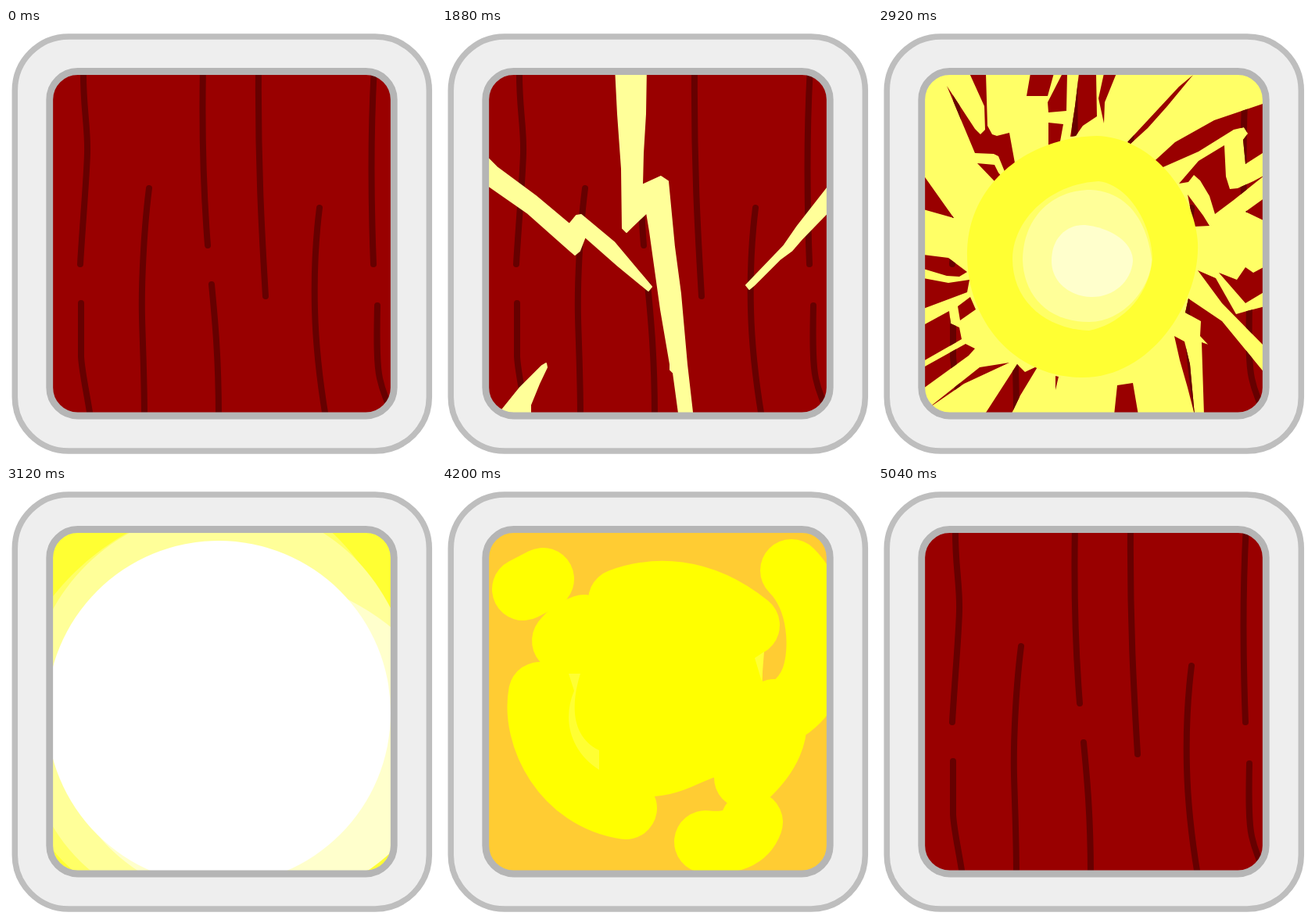
Animation, 550 px wide and 550 px high, one loop 5920 ms. Source, as an HTML page without scripts:

```html
<!DOCTYPE html>
<html lang="en">
<head>
<meta charset="utf-8">
<title>Lightning box</title>
<style>
/* One tick is 40 ms; everything is a function of --t. */
@property --t { syntax: "<integer>"; inherits: true; initial-value: 0; }
@keyframes tick { to { --t: 148; } }

html, body { margin: 0; width: 100%; height: 100%; overflow: hidden; background: #fff; }
svg { display: block; width: 100%; height: 100%; animation: tick 5.92s steps(148) -2ms infinite; }

/* visible from tick a up to tick b */
.on { opacity: clamp(0, min(var(--t) - var(--a) + 1, var(--b) - var(--t)), 1); }

/* a dash that runs along each spine, stopping at --end */
.sweep {
  fill: none; stroke: #fff; stroke-width: 78px; stroke-dasharray: 100px 300px;
  stroke-dashoffset: calc(1px * clamp(var(--end), 100 - (var(--t) - var(--s)) * var(--v), 100));
}
.bolt { fill: #ff9; stroke: #ff9; stroke-width: 2px; stroke-linejoin: round; }
.hole { r: calc(1px * max(0, (72 - var(--t)) * 55)); }
.flash { r: calc(1px * max(0, (var(--t) - 74) * 55)); }
.sun path {
  transform-origin: 262px 293px;
  transform: scale(max(0, 1 + (var(--t) - 73) * var(--k)));
}
.grain { fill: none; stroke: #600; stroke-width: 8px; stroke-linecap: round; }
.brush { fill: none; stroke: #ff0; stroke-width: 80px; stroke-linecap: round; }
</style>
</head>
<body>
<svg viewBox="0 0 550 550">
  <defs>
    <clipPath id="window"><rect x="56" y="56" width="440" height="440" rx="34"/></clipPath>

    <g id="wood">
      <rect x="50" y="50" width="452" height="452" fill="#900"/>
      <g class="grain">
        <path d="M99 50C98 100 105 125 104 160S98 250 95 302"/>
        <path d="M96 352V420C97 440 104 470 108 498"/>
        <path d="M183 205C176 260 173 330 174 370S177 450 177 498"/>
        <path d="M252 50C250 150 253 215 258 278"/>
        <path d="M263 328C267 370 272 420 272 498"/>
        <path d="M323 50C322 170 327 260 332 343"/>
        <path d="M401 230C396 270 394 320 395 360S401 450 409 498"/>
        <path d="M471 50C467 120 466 200 470 302"/>
        <path d="M475 355C474 400 474 430 478 448S485 470 489 482"/>
      </g>
    </g>

    <g id="spineA">
      <path pathLength="100" d="M510 210L450 268 410 305 320 428"/>
      <path pathLength="100" d="M40 440L88 394 140 354 262 240"/>
    </g>
    <g id="spineB">
      <path pathLength="100" d="M242 40L243 225 272 215 314 512"/>
      <path pathLength="100" d="M40 166L168 270 178 255 288 354"/>
      <path pathLength="100" d="M512 200L380 344"/>
      <path pathLength="100" d="M84 510L142 416"/>
    </g>
    <mask id="growA" maskUnits="userSpaceOnUse" x="0" y="0" width="550" height="550">
      <use href="#spineA" class="sweep" style="--s:27;--v:25;--end:-100"/>
      <use href="#spineA" class="sweep" style="--s:63;--v:20;--end:0"/>
    </mask>
    <mask id="growB" maskUnits="userSpaceOnUse" x="0" y="0" width="550" height="550">
      <use href="#spineB" class="sweep" style="--s:43;--v:25;--end:-100"/>
      <use href="#spineB" class="sweep" style="--s:64;--v:20;--end:0"/>
    </mask>

    <mask id="inward" maskUnits="userSpaceOnUse" x="0" y="0" width="550" height="550">
      <rect width="550" height="550" fill="#fff"/>
      <circle class="hole" cx="270" cy="285" fill="#000"/>
    </mask>

    <!-- gaps between the rays -->
    <clipPath id="gaps">
      <path d="M88 74L124 129 131 136 137 130 136 100 117 58H138L140 125 146 136 152 138 168 134 176 178 163 186 154 164 148 161 124 160ZM127 173L149 175 154 185 159 191 150 197ZM195 58H225L217 87H190ZM236 58H242L241 106 218 108 217 95ZM218 121L237 123 233 145 218 152Z"/>
      <path d="M257 58H279L280 113 262 125 253 138 246 139 252 100ZM289 58H305L290 95 289 122 282 90ZM403 60L385 75 319 146 323 148 345 128 370 100Z"/>
      <path d="M495 96L430 118 380 146 345 178 360 180 410 158 455 130 468 127 473 135 467 143 470 174 495 158ZM443 150L410 170 385 199 397 197 404 188 412 195 424 215 431 238 455 220 495 188 480 196 460 205 450 206 445 190ZM396 213L416 240 424 253 404 254ZM495 217L470 235 495 247Z"/>
      <path d="M436 313L459 322 470 306 480 313 495 305V337L470 352ZM409 310L432 320 458 366 472 362 495 356V408L440 352ZM397 346L440 375 495 442V478L480 495 455 492 427 410 412 394 413 375 393 364ZM414 402L426 406 456 495H417ZM379 394L392 401 399 430 405 495 396 460 386 425Z"/>
      <path d="M58 188L97 243 58 232ZM58 290L90 294 114 312 104 318 88 317 58 308ZM58 320L90 326 117 322 114 338 90 347 58 359ZM118 344L125 360 105 374 102 356ZM58 380L91 362 93 378 104 383 107 398 58 426ZM58 434L112 404 124 410 116 419 58 461Z"/>
      <path d="M62 488L130 434 168 428 110 455ZM178 430L188 440 205 432 182 470 170 495H136ZM227 445L231 446 227 463ZM306 457L326 454 333 495H302Z"/>
    </clipPath>

    <g id="melt">
      <rect x="50" y="50" width="452" height="452"/>
      <g fill="currentColor">
        <path d="M50 50H238C256 72 255 92 242 107C228 124 200 120 175 142C140 175 107 220 106 265C105 290 107 300 107 315C104 340 85 352 60 352H50Z"/>
        <path d="M502 282C475 290 464 305 463 325C464 365 455 375 438 405C425 430 420 445 400 448C375 449 355 465 354 502H502Z"/>
      </g>
    </g>
  </defs>

  <rect x="11.3" y="11" width="530" height="530" rx="69" fill="#eee" stroke="#bebebe" stroke-width="7.5"/>

  <g clip-path="url(#window)">
    <use href="#wood"/>

    <!-- lightning -->
    <g class="on" style="--a:28;--b:79">
      <path class="bolt" mask="url(#growA)" d="M498 212L474 234 446 265 402 300 418 306 372 352 384 356 318 420 326 424 402 362 388 356 436 312 424 305 454 270 475 256 498 235ZM56 420L82 392 130 356 122 346 190 300 184 290 250 246 256 250 196 308 206 312 140 352 148 362 90 400 56 434Z"/>
      <path class="bolt on" style="--a:28;--b:30" d="M498 212L474 234 447 265 447 270 453 270 475 256 498 233ZM56 420L66 406 79 392 84 391 91 395 85 403 76 411 56 435Z"/>
      <g mask="url(#growB)">
        <path class="bolt" d="M222 50L225 110 230 180 231 256 236 261 241 256 262 236 266 260 280 360 292 430 292 437 296 441 304 500H321L313 430 305 340 297 280 289 196 280 190 256 201 257 160 260 110 261 50Z"/>
        <path class="bolt" d="M50 158L70 178 120 215 163 251 172 240 178 239 220 274 268 331 264 336 225 304 183 267 176 285 170 290 163 284 110 237 50 195Z"/>
        <path class="bolt" d="M498 198L455 253 437 279 389 329 393 334 399 329 432 296 447 285 460 270 498 231Z"/>
        <path class="bolt" d="M66 502L100 460 128 432 133 429 134 434 124 455 113 482 113 502Z"/>
      </g>
    </g>

    <!-- rays and sun -->
    <g class="on" style="--a:67;--b:79">
      <g mask="url(#inward)">
        <rect x="50" y="50" width="452" height="452" fill="#ff6"/>
        <use href="#wood" clip-path="url(#gaps)"/>
      </g>
      <g class="sun">
        <path style="--k:.27" fill="#ff3" d="M114 285C116 200 190 140 280 138C350 140 405 210 409 275C412 350 350 447 262 447C175 447 112 375 114 285Z"/>
        <path style="--k:.38" fill="#ff6" d="M172 295C172 250 215 200 282 196C320 200 350 250 351 296C345 350 305 380 270 387C215 385 172 350 172 295Z"/>
        <path style="--k:.42" fill="#ff9" d="M185 296C186 240 225 207 272 207C325 210 345 255 350 296C350 330 315 376 270 376C215 376 186 340 185 296Z"/>
        <path style="--k:.75" fill="#ffc" d="M222 298C222 265 245 251 265 252C300 256 326 275 326 298C324 325 300 345 272 344C245 343 222 325 222 298Z"/>
      </g>
      <circle class="flash" cx="272" cy="290" fill="#fff"/>
    </g>
    <rect class="on" style="--a:79;--b:97" x="50" y="50" width="452" height="452" fill="#fff"/>

    <!-- cooling down -->
    <use href="#melt" class="on" style="--a:97;--b:99;fill:#fff;color:#ffc"/>
    <use href="#melt" class="on" style="--a:99;--b:101;fill:#ffc;color:#ff9"/>
    <use href="#melt" class="on" style="--a:101;--b:103;fill:#ff9;color:#ff6"/>
    <use href="#melt" class="on" style="--a:103;--b:105;fill:#ff3;color:#ff0"/>
    <g class="on" style="--a:105;--b:107">
      <rect x="50" y="50" width="452" height="452" fill="#fc3"/>
      <path fill="#ff0" d="M150 190L227 140 390 178 410 215V250L430 320 388 373H347C320 384 300 395 272 397L235 412 122 270Z"/>
      <g class="brush">
        <path d="M104 132L129 119"/>
        <path d="M447 108C484 145 486 210 474 245Q466 268 445 284"/>
        <path d="M227 146C270 130 330 128 392 178"/>
        <path d="M155 198Q165 185 182 179"/>
        <path d="M125 265C115 320 155 400 235 412"/>
        <path d="M425 287Q435 330 388 373"/>
        <path d="M337 455Q385 460 396 430"/>
      </g>
      <path fill="#ff3" d="M162 240H177C163 285 168 322 201 338V363C165 340 153 300 169 262ZM400 220L412 212 409 250Z"/>
    </g>
    <use href="#melt" class="on" style="--a:107;--b:109;fill:#fc3;color:#f93"/>
    <use href="#melt" class="on" style="--a:109;--b:111;fill:#f93;color:#f90"/>
    <use href="#melt" class="on" style="--a:111;--b:113;fill:#f90;color:#f60"/>
    <use href="#melt" class="on" style="--a:113;--b:115;fill:#f60;color:#f30"/>
    <use href="#melt" class="on" style="--a:115;--b:117;fill:#f30;color:#f00"/>
    <use href="#melt" class="on" style="--a:117;--b:119;fill:#f00;color:#c00"/>
    <use href="#melt" class="on" style="--a:119;--b:121;fill:#c00;color:#900"/>
    <use href="#melt" class="on" style="--a:121;--b:123;fill:#900;color:#900"/>
    <g opacity=".5"><use href="#melt" class="on" style="--a:123;--b:126;fill:#900;color:#900"/></g>
  </g>

  <rect x="55.75" y="55.5" width="440.5" height="440.5" rx="36" fill="none" stroke="#b5b5b5" stroke-width="8.8"/>
</svg>
</body>
</html>
```
